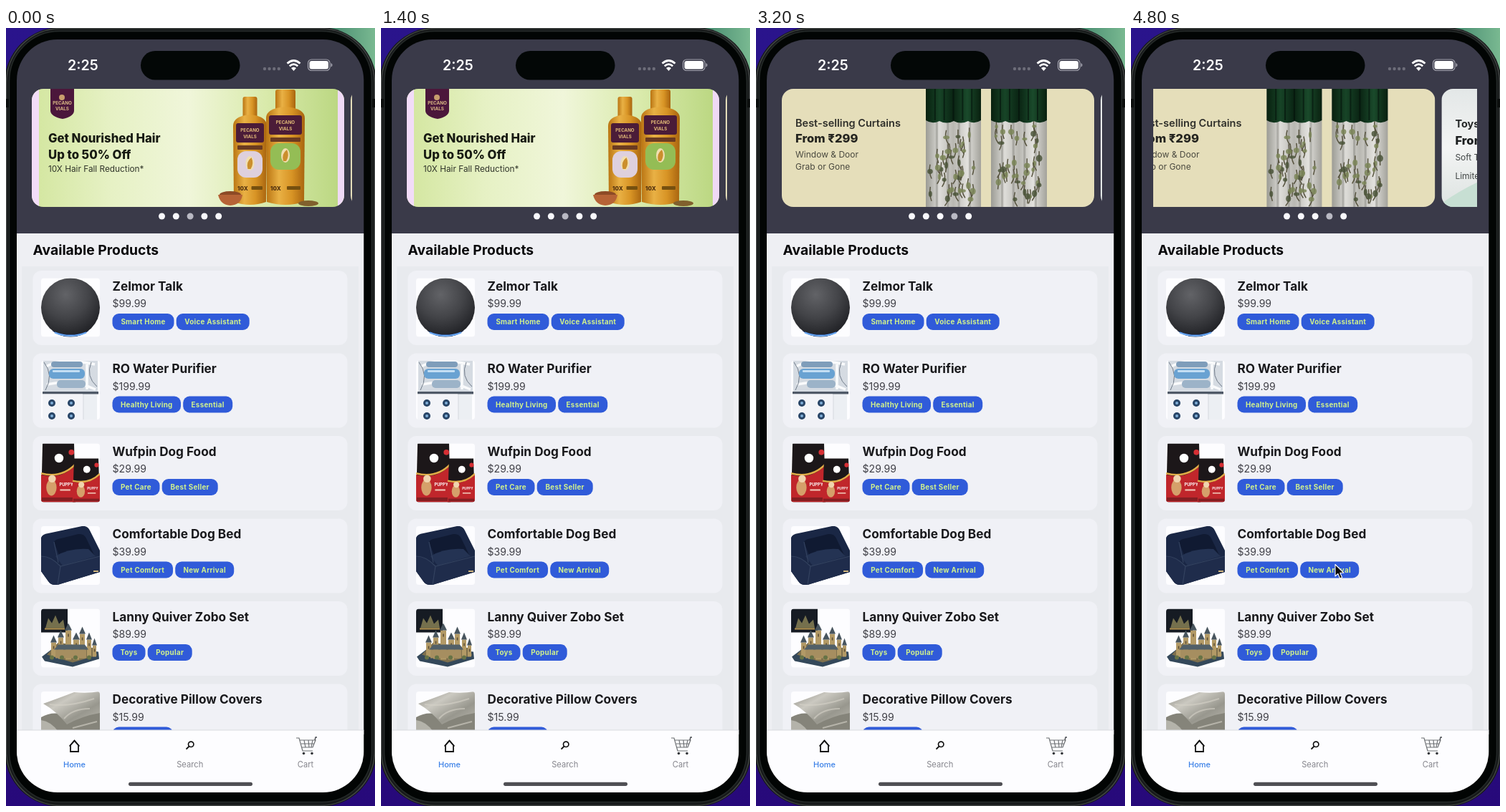
An HTML page that plays this animation: 515 px wide and 1087 px high, repeating every 5 s.

```html
<!DOCTYPE html>
<html lang="en">
<head>
<meta charset="utf-8">
<title>Shop home screen</title>
<style>
  html, body { margin: 0; width: 100%; height: 100%; overflow: hidden; background: #24107c; }
  svg { display: block; width: 100%; height: 100%; font-family: Inter, "Open Sans", sans-serif; }
</style>
</head>
<body>
<svg id="stage" viewBox="0 0 515 1087" xmlns="http://www.w3.org/2000/svg"></svg>
<script>
const LOOP = 5000, STEP = 200;
const PITCH = 445, SLIDE_MS = 330, SLIDE_STARTS = [1730, 4730];
const CURSOR_FROM = 4000;

let seed = 7;
const random = () => (seed = (seed * 16807) % 2147483647) / 2147483647;
const between = (a, b) => a + (b - a) * random();

const rect = (x, y, w, h, fill, r = 0, extra = "") =>
  `<rect x="${x}" y="${y}" width="${w}" height="${h}" rx="${r}" fill="${fill}" ${extra}/>`;
const circle = (x, y, r, fill, extra = "") => `<circle cx="${x}" cy="${y}" r="${r}" fill="${fill}" ${extra}/>`;
const ellipse = (x, y, rx, ry, fill, extra = "") =>
  `<ellipse cx="${x}" cy="${y}" rx="${rx}" ry="${ry}" fill="${fill}" ${extra}/>`;
const path = (d, fill, extra = "") => `<path d="${d}" fill="${fill}" ${extra}/>`;
const line = (d, stroke, width = 1, extra = "") =>
  path(d, "none", `stroke="${stroke}" stroke-width="${width}" ${extra}`);
const text = (x, y, size, weight, fill, value, extra = "") =>
  `<text x="${x}" y="${y}" font-size="${size}" font-weight="${weight}" fill="${fill}" ${extra}>${value}</text>`;
const group = (x, y, content, extra = "") => `<g transform="translate(${x} ${y})" ${extra}>${content}</g>`;
const centered = 'text-anchor="middle"';

const gradient = (id, direction, ...colors) =>
  `<linearGradient id="${id}" ${direction}>${colors.map((c, i) =>
    `<stop offset="${i / (colors.length - 1)}" stop-color="${c}"/>`).join("")}</linearGradient>`;
const down = 'x1="0" y1="0" x2="0" y2="1"', diagonal = 'x1="0" y1="0" x2="1" y2="1"', across = 'x1="0" x2="1"';

const defs = `<defs>
  ${gradient("desktop", down, "#2a148c", "#27097a")}
  ${gradient("corner", across, "#2b6f5d", "#79b991")}
  ${gradient("leaf", across, "#d3e69f", "#e6f1c4", "#f0f6da", "#d9eaab", "#b9d67f")}
  ${gradient("gold", across, "#b97412", "#e9b145", "#d89425", "#a8640f")}
  ${gradient("drape", across, "#08200f", "#174427", "#0a2413", "#1a4a2b", "#09200f")}
  ${gradient("cloth", across, "#9c9c95", "#dddcd8", "#b9b8b2", "#e2e1dd", "#a3a29b")}
  ${gradient("toy", down, "#e3e7e7", "#f3f4f4", "#dde3e1")}
  ${gradient("satin", diagonal, "#8f8e86", "#cbc9c1", "#98978e", "#b9b7ae")}
  <radialGradient id="ball" cx=".42" cy=".28" r=".78">
    <stop offset="0" stop-color="#626367"/><stop offset=".5" stop-color="#434448"/><stop offset="1" stop-color="#1b1c20"/>
  </radialGradient>
  <clipPath id="screen">${rect(15, 16, 484.3, 1052, "#000", 57)}</clipPath>
  <clipPath id="carousel">${rect(31, 80, 452, 175, "#000")}</clipPath>
  <clipPath id="banner">${rect(0, 0, 436, 165, "#000", 16)}</clipPath>
  <clipPath id="thumb">${rect(0, 0, 82, 82, "#000", 4)}</clipPath>
</defs>`;

function bottle(x, top, w, capW, capH, accent) {
  const mid = x + w / 2, shoulder = top + capH;
  return rect(mid - capW / 2, top, capW, capH + 6, "url(#gold)", 3)
    + path(`M${x} ${shoulder + 16}Q${x} ${shoulder + 2} ${mid} ${shoulder}Q${x + w} ${shoulder + 2} ${x + w} ${shoulder + 16}L${x + w - 1} 158Q${mid} 166 ${x + 1} 158Z`, "url(#gold)")
    + rect(x + 4, shoulder + 12, w - 8, 27, "#4b1c38", 3)
    + text(mid, shoulder + 24, 6.2, 700, "#e4bd79", "PECANO", centered)
    + text(mid, shoulder + 33, 6.2, 700, "#e4bd79", "VIALS", centered)
    + rect(x + 6, shoulder + 43, w - 12, 6, "#6b3b21", 1)
    + rect(x + 6, shoulder + 51, w - 12, 37, accent, 12)
    + ellipse(mid, shoulder + 68, 6, 10, "#f1dfb0")
    + path(`M${mid - 3} ${shoulder + 76}q-3-10 5-16q4 8-1 16z`, "#cb8f2d")
    + text(x + 6, 142, 8, 800, "#50300f", "10X")
    + rect(mid + 2, 136, w / 2 - 8, 5, "#76500f", 1);
}

const hairBanner = rect(0, 0, 436, 165, "url(#leaf)")
  + rect(0, 0, 10, 165, "#f2dcf8") + rect(427, 0, 9, 165, "#efd9f5")
  + path("M26 0h33v31q-1 8-16 11q-16-3-17-11z", "#4b173b")
  + circle(42, 12, 4, "#c89d6d")
  + text(42.5, 22, 6.3, 700, "#dab985", "PECANO", centered)
  + text(42.5, 30, 6.3, 700, "#dab985", "VIALS", centered)
  + text(23, 75, 16.7, 800, "#171a12", "Get Nourished Hair")
  + text(23, 98, 16.7, 800, "#171a12", "Up to 50% Off")
  + text(23, 116, 11.8, 400, "#30352a", "10X Hair Fall Reduction*")
  + bottle(281, 11, 47, 20, 25, "#ded0dd")
  + bottle(327, 1, 54, 28, 24, "#94bd55")
  + ellipse(277, 148, 15, 5, "#8d4a26")
  + path("M260 148h34q-2 14-17 15q-14-1-17-15z", "#b66336")
  + ellipse(386, 160, 14, 4, "#80602d");

function curtain(x, w) {
  let art = rect(x, 0, w, 165, "url(#cloth)");
  for (let k = 1; k < 5; k++) art += line(`M${x + k * w / 5} 44v121`, "#5f5e57", 3, 'opacity=".3"');
  for (let i = 0; i < 34; i++) {
    const px = x + between(8, w - 10), py = between(62, 165), bend = between(-8, 8);
    art += line(`M${px} ${py}q${bend} -9 ${bend / 2} -20`, "#57533f", 1.5);
    art += ellipse(px + bend / 2, py - 10, between(2, 4.5), between(2, 5), i % 3 ? "#7c8659" : "#4c553a", 'opacity=".85"');
  }
  art += path(`M${x} 0h${w}v44q-9 6-18 1q-10 5-20 0q-10 5-20 0q-10 5-${w - 58} -1z`, "url(#drape)");
  for (let k = 1; k < 6; k++) art += line(`M${x + k * w / 6} 0v44`, "#04110a", 2, 'opacity=".6"');
  return art;
}

const curtainBanner = rect(0, 0, 436, 165, "#e5deba")
  + curtain(201, 77) + curtain(292, 78)
  + text(19, 52.5, 14.5, 600, "#30302b", "Best-selling Curtains")
  + text(19, 75, 16.6, 800, "#24241f", "From ₹299")
  + text(19, 96, 12, 400, "#4a493f", "Window &amp; Door")
  + text(19, 113, 12, 400, "#4a493f", "Grab or Gone");

const toyBanner = rect(0, 0, 436, 165, "url(#toy)")
  + path("M0 165V160Q28 140 60 126L436 106V165Z", "#c7dfd3")
  + text(19, 54, 14.5, 700, "#262829", "Toys &amp; Games")
  + text(19, 78, 16.6, 800, "#1b1d1e", "From ₹99")
  + text(19, 100, 12, 400, "#414545", "Soft Toys &amp; more")
  + text(19, 126, 12, 400, "#414545", "Limited deals")
  + circle(330, 70, 30, "#b58354") + ellipse(330, 126, 40, 36, "#b58354");

const banners = [[2, hairBanner], [3, curtainBanner], [4, toyBanner]];

const speaker = circle(41, 41, 41, "url(#ball)")
  + path("M15 73Q41 84 67 73Q57 82 41 82Q25 82 15 73Z", "#162c5c")
  + line("M19 76Q41 85 63 76", "#6aa8f2", 2.4);

const purifier = rect(3, 0, 76, 43, "#d5dbe2")
  + line("M7 8Q30 -5 75 5M8 33Q45 25 76 40M64 5v35", "#fafbfc", 3.5)
  + line("M4 2Q18 20 6 41M70 2Q62 22 78 36", "#6f7a88", 1)
  + rect(14, 1, 44, 8, "#7f9dba", 4) + rect(11, 11, 50, 14, "#69a2d2", 6) + rect(16, 13, 38, 3, "#c3def3", 1)
  + rect(22, 27, 40, 11, "#9cb3c8", 5) + rect(2, 43, 78, 3.5, "#4f5967") + rect(2, 46.5, 56, 36, "#f3f4f8")
  + [[15, 59], [42, 59], [15, 77], [42, 77]].map(([x, y]) => circle(x, y, 5, "#284567") + circle(x, y, 2, "#7faed8")).join("")
  + rect(60, 47, 18, 35, "#eceff3") + line("M59 47v35", "#c6ccd4", 1);

const bag = (x, y, w, h) =>
  path(`M${x + 2} ${y}H${x + w - 2}L${x + w} ${y + h}H${x}Z`, "#1c1719")
  + path(`M${x} ${y + h * .53}Q${x + w * .6} ${y + h * .62} ${x + w} ${y + h * .37}V${y + h}H${x}Z`, "#c0262b")
  + line(`M${x} ${y + h * .51}Q${x + w * .6} ${y + h * .6} ${x + w} ${y + h * .35}`, "#e2ad47", 2.5)
  + circle(x + w * .52, y + h * .25, w * .13, "#fff")
  + circle(x + w * .88, y + h * .15, w * .08, "#d62f34")
  + ellipse(x + w * .3, y + h * .75, w * .15, h * .14, "#d5a06a")
  + circle(x + w * .32, y + h * .6, w * .11, "#f0d4ae")
  + text(x + w * .53, y + h * .72, w * .12, 700, "#fff", "PUPPY")
  + rect(x + w * .55, y + h * .78, w * .3, h * .025, "#f2cabb")
  + rect(x + 1, y + h * .92, w - 2, h * .06, "#831e22");
const dogFood = bag(0, 0, 48, 82) + bag(44, 21, 38, 61);

const dogBed = path("M0 16Q2 11 10 10L57 0Q65 -1 68 6L82 34V64L23 82Q14 83 10 77L0 63Z", "#1a2745")
  + path("M18 22Q20 18 28 17L52 11Q60 10 63 17L75 42L30 54Z", "#101a32")
  + path("M20 42Q40 30 66 32L76 42L30 55Z", "#243353")
  + path("M0 42Q14 42 27 56L82 42V64L23 82Q14 83 10 77L0 63Z", "#1f2c4b")
  + line("M0 42Q14 42 27 56L82 42M27 56L23 82M18 22L24 51", "#33425f", 1.2) + rect(73, 62, 7, 2, "#d2b77e");

const tower = (x, y, w, h) => rect(x, y, w, h, "#b39a66")
  + path(`M${x - 1} ${y}L${x + w / 2} ${y - 10}L${x + w + 1} ${y}Z`, "#48555e")
  + rect(x + w / 2 - .7, y + 5, 1.5, 4, "#574a37");
const castle = rect(0, 0, 37, 33, "#161b23") + path("M6 27L10 13L15 20L20 9L25 21L31 15L33 27Z", "#75704d")
  + rect(5, 27, 28, 2, "#b39351")
  + path("M1 67L18 54L80 60L81 70L44 81L5 73Z", "#34485a") + path("M8 64L24 47L75 55L78 65L44 75Z", "#7e704d")
  + [[14, 47, 7, 20], [24, 40, 7, 30], [34, 30, 8, 41], [45, 43, 8, 28], [54, 35, 7, 34], [64, 43, 6, 24], [72, 51, 5, 16]].map(p => tower(...p)).join("")
  + rect(20, 57, 43, 12, "#a68e60") + path("M18 57L24 50H61L66 57Z", "#526068")
  + [15, 29, 48, 67].map(x => circle(x, 68, 3, "#667346")).join("");

const pillows = path("M0 36Q16 26 40 34L82 26V82H0Z", "#85847a")
  + path("M0 40Q14 42 24 56H0Z", "#b4b3aa")
  + path("M3 17Q28 8 46 1Q64 3 82 0V30Q58 34 36 46Q22 28 3 17Z", "url(#satin)")
  + line("M12 18Q39 22 74 10M32 38Q44 24 68 24M44 51L78 42", "#d5d3c9", 2, 'opacity=".6"');

const products = [
  ["Zelmor Talk", "$99.99", speaker, ["Smart Home", 86], ["Voice Assistant", 102]],
  ["RO Water Purifier", "$199.99", purifier, ["Healthy Living", 95.5], ["Essential", 69]],
  ["Wufpin Dog Food", "$29.99", dogFood, ["Pet Care", 66], ["Best Seller", 78]],
  ["Comfortable Dog Bed", "$39.99", dogBed, ["Pet Comfort", 84.5], ["New Arrival", 82]],
  ["Lanny Quiver Zobo Set", "$89.99", castle, ["Toys", 46], ["Popular", 62]],
  ["Decorative Pillow Covers", "$15.99", pillows, ["Home Decor", 84.5]],
];

function productCard([title, price, art, ...tags], index) {
  let x = 111, pills = "";
  for (const [label, w] of tags) {
    pills += rect(x, 60, w, 23, "#305bd9", 9)
      + text(x + w / 2, 75.2, 9.8, 700, "#d1f28c", label, `${centered} letter-spacing=".3"`);
    x += w + 3.2;
  }
  return group(37.5, 339 + index * 115.5,
    rect(0, 0, 439, 104, "#f0f1f6", 12)
    + group(11.5, 10.5, rect(0, 0, 82, 82, "#fdfdff") + art, 'clip-path="url(#thumb)"')
    + text(111, 27.5, 17.2, 700, "#18181b", title)
    + text(111, 51, 14.1, 400, "#404047", price) + pills);
}

const statusBar = text(86, 59, 19.6, 600, "#fff", "2:25")
  + rect(188, 32, 138.5, 40.5, "#030706", 20.2)
  + [361, 367.6, 374.2, 380.8].map(x => circle(x, 57, 2.2, "#6d6d79")).join("")
  + line("M392.5 49.5Q401.5 41.5 410.5 49.5M395.8 53.2Q401.5 48 407.2 53.2", "#fff", 2.8)
  + path("M398 56Q401.5 53 405 56L401.5 60Z", "#fff")
  + rect(421.5, 44, 30.5, 15.5, "none", 5, 'stroke="#a2a2ad" stroke-width="1.2"')
  + rect(423.5, 46, 26.5, 11.5, "#fff", 3.2) + path("M453.5 49q2 .5 2 2.8t-2 2.8z", "#a2a2ad");

const cart = line("M405 992h4l5 18h14M410 995h22l-4 10h-15M412 1000h18M416 995l2 10M422 995l1 10M428 995l-2 10", "#6d7073", 1.2)
  + line("M431 995l1-4h2", "#42454a", 1.3)
  + circle(415.5, 1013.5, 1.8, "#34363a") + circle(427, 1013.5, 1.8, "#34363a");

const tabBar = rect(15, 981, 485, 88, "#fdfdff") + rect(15, 980.5, 485, 1, "#dadbe0")
  + line("M90 1011V1002L95.5 995.8L101 1002V1011Z", "#111", 1.8)
  + line("M88.5 1003.5L95.5 995.5L102.5 1003.5", "#111", 1.6)
  + circle(258.2, 1000.8, 3.7, "none", 'stroke="#111" stroke-width="1.7"')
  + line("M255.5 1003.6L251.5 1007.6", "#111", 2)
  + cart
  + text(95.5, 1032.5, 11, 500, "#3b80e7", "Home", centered)
  + text(256.7, 1032.5, 11.2, 400, "#85858c", "Search", centered)
  + text(418, 1032.5, 11.2, 400, "#85858c", "Cart", centered)
  + rect(171, 1053.7, 173, 5.2, "#505055", 2.6);

const phone = rect(0, 0, 515, 1087, "url(#desktop)") + rect(415, 0, 100, 110, "url(#corner)")
  + rect(-2, -1, 519, 1089, "#171a1a", 78)
  + rect(.5, .5, 514, 1086, "none", 76, 'stroke="#444847" stroke-width="1.5"')
  + rect(4.5, 4.5, 506, 1077, "#020504", 70, 'stroke="#252a29" stroke-width="1.5"')
  + rect(0, 99, 4, 12, "#0b0e0d") + rect(511, 99, 4, 12, "#0b0e0d");

const content = rect(15, 16, 485, 271, "#3a3a49") + rect(15, 287, 485, 700, "#eeeff3")
  + rect(22, 333, 470, 650, "#e8eaee")
  + text(37.5, 317, 19.3, 700, "#09090b", "Available Products")
  + products.map(productCard).join("")
  + `<g clip-path="url(#carousel)"><g id="track">${banners.map(([page, art]) =>
      group(36 + (page - 2) * PITCH, 85, art, 'clip-path="url(#banner)"')).join("")}</g></g>`
  + [0, 1, 2, 3, 4].map(i => circle(217.5 + i * 19.8, 263, 4.5, "#f8f8fc", 'class="dot"')).join("")
  + statusBar + tabBar;

const pointer = path("M285 749.5V766L288.8 762.4L291.6 769L294.6 767.7L291.8 761.3H297Z", "#080808",
  'id="cursor" stroke="#fff" stroke-width="1.1" stroke-linejoin="round"');

const stage = document.getElementById("stage");
stage.innerHTML = defs + phone + `<g clip-path="url(#screen)">${content}</g>` + pointer;

const track = document.getElementById("track");
const cursor = document.getElementById("cursor");
const dots = [...stage.querySelectorAll(".dot")];
const ease = p => (1 - Math.cos(Math.PI * Math.min(1, Math.max(0, p)))) / 2;

function render(time) {
  const slid = SLIDE_STARTS.reduce((sum, start) => sum + ease((time - start) / SLIDE_MS), 0);
  const active = 2 + Math.round(slid);
  track.setAttribute("transform", `translate(${-slid * PITCH} 0)`);
  dots.forEach((dot, i) => dot.setAttribute("fill", i === active ? "#b9b9c3" : "#f8f8fc"));
  cursor.setAttribute("visibility", time >= CURSOR_FROM ? "visible" : "hidden");
}

// The screen refreshes five times a second.
function tick(now) {
  render(Math.floor((now % LOOP) / STEP) * STEP);
  requestAnimationFrame(tick);
}
render(0);
requestAnimationFrame(tick);
</script>
</body>
</html>
```
